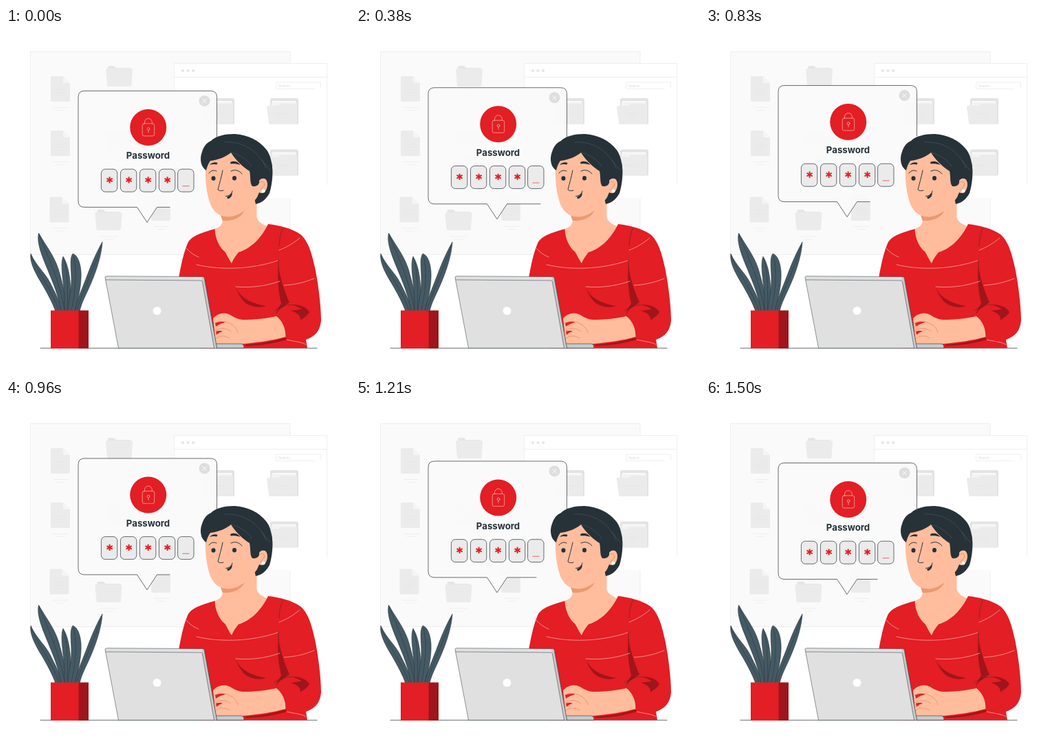
An HTML page for the animation above (1.54 s loop, 500 px wide and 500 px high).

```html
<!DOCTYPE html>
<html lang="en">
<head>
<meta charset="utf-8">
<title>Password prompt</title>
<style>
  html, body { margin: 0; width: 100%; height: 100%; overflow: hidden; background: #fff; }
  svg { display: block; width: 100vw; height: 100vh; }
  .ink { fill: none; stroke: #263238; stroke-width: .7; stroke-linecap: round; stroke-linejoin: round; }
  .pale { fill: none; stroke: #f7b9b4; stroke-width: .7; stroke-linecap: round; }
  .red { fill: #e31e24; }
  .deep { fill: #a0151b; }
  .dark { fill: #263238; }
  .skin { fill: #ffbd9d; }
  .grey { fill: #ebebeb; }
  .leaf { fill: #455a64; stroke: #263238; stroke-width: .6; }
</style>
</head>
<body>
<svg viewBox="0 0 500 500" xmlns="http://www.w3.org/2000/svg">
  <defs>
    <g id="file">
      <path class="grey" d="M2 0H18L28 10V35Q28 37 26 37H2Q0 37 0 35V2Q0 0 2 0Z"/>
      <path d="M18 0V8Q18 10 20 10H28Z" fill="#f5f5f5"/>
      <path d="M6 20H22M6 24H22M6 28H17" stroke="#e5e5e5" stroke-width=".6"/>
      <path d="M4 45.500H26M9 49.500H21" stroke="#ececec" stroke-width=".8"/>
    </g>
    <g id="folder">
      <path d="M3 26V3Q3 0 5 0H12L15 3H35Q37 3 37 6V28Z" fill="#e6e6e6"/>
      <path class="grey" d="M0 6Q0 4 2 4H37Q39 4 39 6L37.500 28Q37.500 30 35 30H4Q2 30 2 28Z"/>
      <path d="M7 39H32M13 43H26" stroke="#ececec" stroke-width=".8"/>
    </g>
    <g id="pack">
      <path d="M5 36V3Q5 0 8 0H43Q46 0 46 3V36Q46 38 43 38H8Z" fill="#e3e3e3"/>
      <path d="M8 4H42V12H8Z" fill="#fafafa"/>
      <path d="M7 6H43V14H7Z" fill="#f3f3f3"/>
      <path class="grey" d="M0 13Q0 11 2 11H17L20 8H42Q44 8 44 10V36Q44 38 42 38H5Q3 38 3 36Z"/>
      <path d="M13 23H31M17 27H27" stroke="#e4e4e4" stroke-width=".6"/>
    </g>
    <path id="star" d="M0-4.600V4.600M-4.100-2.300L4.100 2.300M-4.100 2.300L4.100-2.300" stroke="#e31e24" stroke-width="2"/>
  </defs>

  <!-- windows -->
  <rect x="35.500" y="34.500" width="377.500" height="295" fill="#fafafa" stroke="#ebebeb" stroke-width=".8"/>
  <use href="#file" x="65" y="70"/>
  <use href="#file" x="65" y="149"/>
  <use href="#file" x="63.500" y="245.500"/>
  <use href="#file" x="211" y="243"/>
  <use href="#folder" x="145" y="55"/>
  <use href="#folder" x="146" y="149"/>
  <use href="#folder" x="129.500" y="264"/>
  <rect x="244.500" y="51.500" width="222.500" height="196" fill="#fff"/>
  <path d="M244.500 240V51.500H466.500V228M244.500 71.500H466.500" fill="none" stroke="#ebebeb" stroke-width=".8"/>
  <g fill="#e6e6e6"><circle cx="257" cy="62" r="2.100"/><circle cx="264.500" cy="62" r="2.100"/><circle cx="272" cy="62" r="2.100"/></g>
  <path d="M457.500 87V79H392.500V88.500H449" fill="none" stroke="#ebebeb" stroke-width=".8"/>
  <text x="396" y="85.500" font-family="Inter, sans-serif" font-size="4.800" fill="#d6d6d6">Search...</text>
  <use href="#pack" x="379" y="102"/>
  <use href="#pack" x="379" y="176.500"/>
  <use href="#pack" x="286" y="102"/>

  <!-- prompt -->
  <g id="prompt">
    <path d="M114 91.500H297.500Q306.500 91.500 306.500 100.500V251.500Q306.500 260.500 297.500 260.500H219.500L205 282.500L190.500 260.500H114Q105 260.500 105 251.500V100.500Q105 91.500 114 91.500Z" fill="#fafafa" fill-opacity=".95"/>
    <path id="edge" class="ink"/>
    <circle cx="288.500" cy="106" r="8" fill="#dedede"/>
    <path d="M285.500 103L291.500 109M291.500 103L285.500 109" stroke="#fff" stroke-width=".9"/>
    <circle class="red" cx="206.700" cy="144.500" r="26.500"/>
    <g class="pale">
      <rect x="198.200" y="139" width="17.500" height="18" rx="2.500"/>
      <path d="M201.500 139V137A5.400 5.400 0 0 1 212.300 137V139"/>
      <circle cx="207" cy="146.700" r="1.900"/><path d="M207 148.500V152"/>
    </g>
    <text x="206.500" y="190.300" text-anchor="middle" font-family="Inter, sans-serif" font-weight="700" font-size="13.200" fill="#263238">Password</text>
    <g id="slots"></g>
    <path d="M256.500 229.800H266.500" stroke="#e8474b" stroke-width=".8"/>
  </g>

  <path class="ink" d="M50 465.300H452"/>

  <!-- plant -->
  <g class="leaf">
    <path d="M36 328C34 340 42 355 51 370C60 385 68 400 72 412H82C78 397 72 386 64 370C57 356 44 346 36 328Z"/>
    <path d="M47.500 298C44 312 53 333 60 350C68 370 77 390 80 412H89C88 398 85 380 76 350C70 331 57 315 47.500 298Z"/>
    <path d="M83 332C79 342 82 360 84 378C85 390 85 400 85 412H93C95 385 95 352 83 332Z"/>
    <path d="M97 328C92 335 95 350 95 365C95 385 90 397 90 412H100C106 390 110 372 109 354C108 341 104 330 97 328Z"/>
    <path d="M140 311C139 328 133 349 124 370C117 387 110 398 107 412H100C103 396 108 385 114 370C120 355 126 336 140 311Z"/>
    <path fill="none" stroke-width=".5" d="M36 330C45 353 66 380 77 410M48 300C60 330 79 370 85 410M84 335C90 355 90 385 89 410M98 331C104 350 101 385 95 410M139 314C131 345 112 380 103 410"/>
  </g>
  <path class="red" d="M65 410.500H106V465.800H65Z"/>
  <path class="deep" d="M105.500 410.500H120V465.800H105.500Z"/>

  <!-- neck, shirt -->
  <path class="skin" d="M315 265V280Q314 289 303 292L300 302L312 330L327 345L384 290Q366 284 364.500 275V230H330Z"/>
  <path fill="#eb996e" d="M312 272C324 277 335 274 347 265C341 277 328 281 314.500 280Z"/>
  <path class="red" d="M303.500 292C287 297 270 301 264 313C258 327 254 346 251 364L280 465.300H438L436 453C450 448 457 439 458 425C458 405 454 372 449 348C445 330 440 310 428 300C415 291 398 287 381 285C372 304 356 321 338 326C334 331 330 336 328 342C323 335 321 329 318 325C310 319 304 306 303.500 292Z"/>
  <g class="deep">
    <path d="M396 345C398 362 404 381 412 399C405 403 397 410 393 416C392 411 398 405 400 400C396 383 394 364 396 345Z"/>
    <path d="M334 377C340 391 354 400 378 404C368 408 350 405 343 394C339 389 336 383 334 377Z"/>
    <path d="M349 460C367 459 386 456 406 450L409 453C390 458 371 462 347 462Z"/>
  </g>
  <path class="pale" d="M262 320C267 326 273 330 280 333M277 344C315 353 360 350 395 338M334 376C356 378 378 375 398 368M404 374C420 373 434 370 448 364M397 323C407 319 418 313 427 305M408 453C420 456 429 456 436 460"/>
  <path class="ink" style="stroke-width:.5" d="M402 291C399 300 397 308 397 317M396 337V349M390 411C401 402 416 400 428 405"/>
  <path class="red" d="M392 419C394 407 409 400 424 404C438 409 442 428 435 441C429 451 415 454 406 449C405 437 399 426 392 419Z"/>
  <path class="deep" d="M414 402C426 402 437 405 441 413C438 419 432 421 428 425C429 418 422 413 414 411C422 410 426 409 430 409C425 405 419 403 414 402Z"/>
  <path class="pale" d="M392 419C402 426 406 437 406 449"/>

  <!-- arm, hand -->
  <path class="skin" d="M301 422C306 416 315 413 321 415C328 417 333 423 344 424C362 424 379 422 393 419C402 426 407 438 406 449C388 454 367 457 345 459H305Z"/>
  <path class="red" d="M304 429Q312 425 319 428Q312 429 305 434ZM305 441Q311 439 315 441Q310 442 306 446Z"/>
  <path class="ink" style="stroke:#d97f58;stroke-width:.6" d="M303 429C312 425 320 426 328 431M304 440C312 435 320 436 327 441M305 451C312 446 319 447 325 451M328 431C333 434 336 438 337 443"/>

  <!-- laptop -->
  <path d="M302 459H342Q346 459 346 465.300H302Z" fill="#c9c9c9" stroke="#263238" stroke-width=".6"/>
  <path d="M144 362.500Q144 360.700 147 360.700L285 361.500Q288 361.500 288.500 365L306.500 465.300H163.500Z" fill="#e0e0e0" stroke="#263238" stroke-width=".5"/>
  <path d="M284 362Q288 362 288.500 365L306.500 465.300H302.500L285 368Z" fill="#c9c9c9"/>
  <path class="ink" style="stroke-width:.5" d="M145 366L283 367Q285 367 285.500 369L302.500 465M288.500 365L306.500 465.300"/>
  <circle cx="219.500" cy="411" r="6" fill="#fff"/>

  <!-- head -->
  <path class="dark" d="M340 160L386 196C389 209 387 227 383 240C378 249 372 254 363 256L352 210Z"/>
  <path class="skin" d="M291 190C288 215 291 238 296 253C300 266 309 273 318 274C336 274 354 262 365 246L368 239C375 243 380 235 380 227C380 219 374 216 368 220L362 184L325 172Z"/>
  <path class="dark" d="M291 207C283 202 281 190 285 180C287 173 291 167 298 164C305 157 318 154 332 154C352 155 368 164 377 175C384 182 388 198 387 212L383 232L379 221C376 217 370 218 368 222C369 227 365 231 358 230C354 225 356 218 354 208C346 203 335 194 327 181C320 187 308 192 297 193C294 197 292 202 291 207Z"/>
  <path class="ink" style="stroke:#52616a;stroke-width:.5" d="M318 166C345 164 369 180 378 204M327 181C337 183 350 190 357 201M372 192L384 207"/>
  <path class="ink" style="stroke:#c97854;stroke-width:.6" d="M370 224C374 222 377 225 375 230C373 231 371 233 370 236"/>
  <circle cx="374" cy="237" r="2.500" fill="#fff"/>
  <g class="dark">
    <ellipse cx="301.500" cy="218.500" rx="3" ry="3.200"/>
    <ellipse cx="332" cy="218.300" rx="3" ry="3.200"/>
    <path d="M296 199C299 195.500 304 194.500 307.500 196L306.500 198.500C303 197.500 300 198 296 199Z"/>
    <path d="M326 195C331 192.500 337 194 340.500 199C336 197.500 331 197 326.500 197.500Z"/>
    <path d="M328.500 238.500C329.500 243 327 247 322.500 248.500Q321.500 247 321 245.500Q326 244 328.500 238.500Z"/>
  </g>
  <path class="ink" style="stroke-width:1" d="M295 211C298 207 302 206 306 208M327 208C333 205 339 207 343 212M315 207C313 217 310 227 308 235C310 237 313 237 316 236M319.500 244.500C325 244 328 241 329 237"/>
</svg>
<script>
  const LOOP = 1540;
  const get = id => document.getElementById(id);
  const prompt = get('prompt'), edge = get('edge');

  get('slots').innerHTML = [138.4, 166.4, 194.4, 222.4, 249.6].map((x, i) =>
    `<rect x="${x}" y="205.200" width="23.400" height="33" rx="6" fill="#ebebeb" stroke="#263238" stroke-width=".7"/>` +
    (i < 4 ? `<use href="#star" x="${x + 12.2}" y="221"/>` : '')).join('');

  // Far end of the lower border, right of the pointer
  function borderEnd(t) {
    if (t < 40 || (t >= 580 && t < 1080)) return 238;
    return t < 580 ? 268 : 268 - 19 * (t - 1080) / 420;
  }

  function draw(t) {
    const lift = 4.15 * (Math.cos(2 * Math.PI * (t + 40) / LOOP) - 1);
    prompt.setAttribute('transform', `translate(0 ${lift.toFixed(2)})`);
    edge.setAttribute('d', 'M306.500 165V100.500Q306.500 91.500 297.500 91.500H114Q105 91.500 105 100.500' +
      'V251.500Q105 260.500 114 260.500H190.500L205 282.500L219.500 260.500H' + borderEnd(t).toFixed(1));
  }

  const start = performance.now();
  function tick() {
    draw((performance.now() - start) % LOOP);
    requestAnimationFrame(tick);
  }
  draw(0);
  requestAnimationFrame(tick);
</script>
</body>
</html>
```
